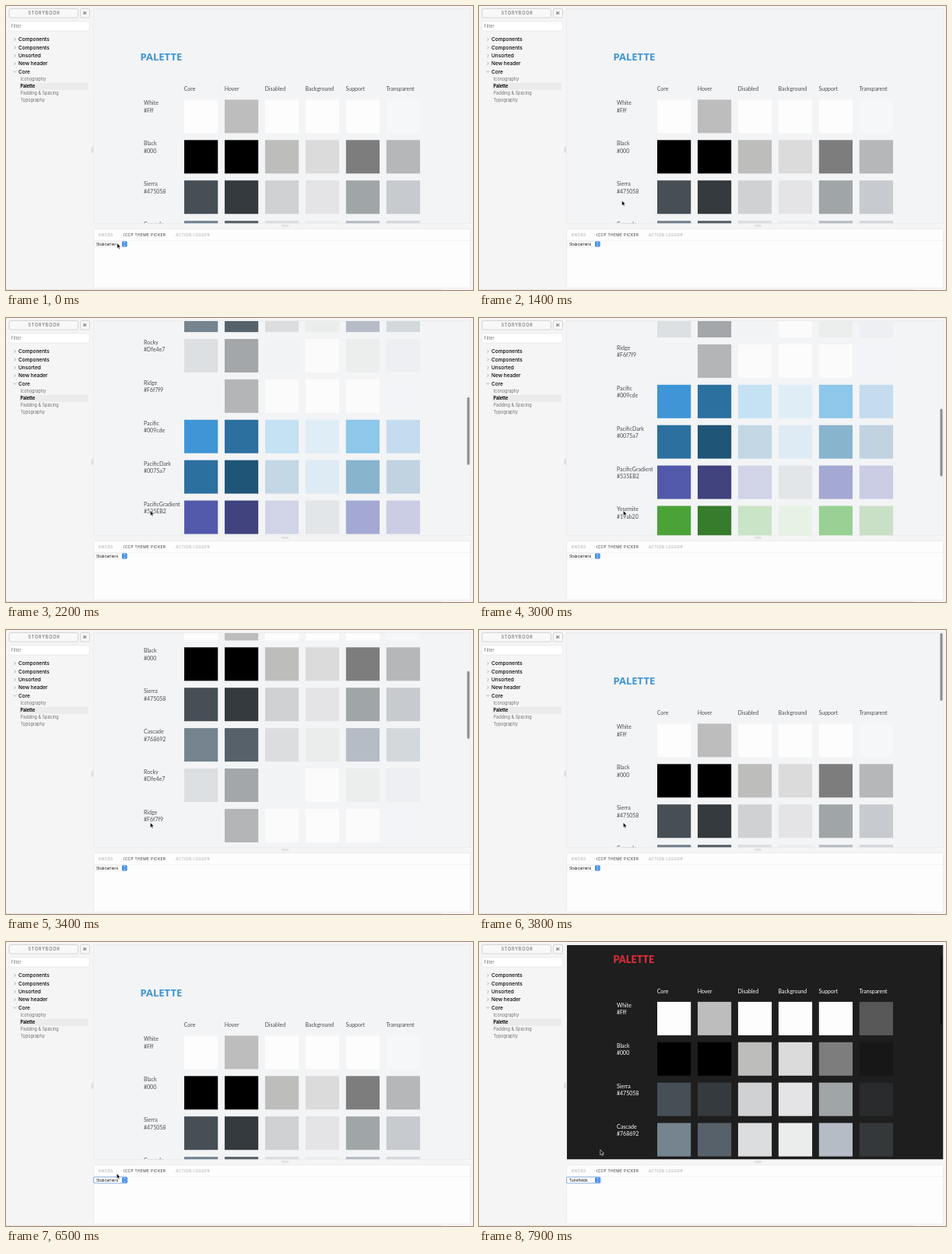
An HTML page that plays this animation: 600 px wide and 365 px high, repeating every 8 s.

```html
<!DOCTYPE html>
<html lang="en">
<head>
<meta charset="utf-8">
<style>
  html, body { margin: 0; width: 100%; height: 100%; overflow: hidden; background: #f5f5f5; }
  svg { display: block; --page: #f3f4f6; --ink: #4b4e53; --title: #3d95d6; font: 5.5px Inter, sans-serif; }
  svg.dark { --page: #1e1e1e; --ink: #fff; --title: #da2a3c; }
  text { white-space: pre; }
  .page { fill: var(--page); }
  .palette text { font: 7px Lato, sans-serif; fill: var(--ink); }
  .palette .title { font: 700 13px "Open Sans", sans-serif; fill: var(--title); }
  .dark .palette .title { font: 900 12.6px Lato, sans-serif; }
  .group { font-size: 6.5px; font-weight: 500; }
  .story { fill: #6f6f6f; }
  .active { fill: #000; font-weight: 700; }
  .tab { font-size: 4.8px; letter-spacing: .38px; fill: #a9a9a9; }
  .tab.on { fill: #333; }
  .brand { font-weight: 600; letter-spacing: .75px; fill: #828282; }
  .small { font-size: 4.8px; }
  .line { fill: none; stroke: #888; stroke-width: .7; }
</style>
</head>
<body>
<svg id="stage" width="600" height="365" viewBox="0 0 600 365">
  <clipPath id="view"><rect x="113" y="4" width="483.5" height="275.5"/></clipPath>
  <rect width="600" height="365" fill="#f5f5f5"/>
  <rect y="364" width="560" height="1" fill="#e4e4e4"/>

  <g fill="#f8f8f8" stroke="#c6c6c6" stroke-width=".7">
    <rect x="4" y="3.5" width="88.5" height="11.5" rx="1.5"/>
    <rect x="95.5" y="3.5" width="12" height="11.5" rx="1.5"/>
    <rect x="4" y="20" width="103.5" height="12" rx="1.5" fill="#fff" stroke="#e6e6e6"/>
  </g>
  <text class="brand" x="28.5" y="11.3">STORYBOOK</text>
  <text x="98.6" y="11.3" fill="#555" style="font-family:'DejaVu Sans',sans-serif">⌘</text>
  <text x="6.5" y="28.1" fill="#777">Filter</text>
  <rect x="17" y="98.8" width="89" height="8.8" fill="#ebebeb"/>
  <g id="tree"></g>
  <path class="line" d="M110 180.5v8M111.3 180.5v8M354 281.8h9M354 283.3h9" style="stroke:#ccc"/>

  <g clip-path="url(#view)">
    <rect class="page" x="112" y="3" width="486" height="278"/>
    <g class="palette" id="palette"><text class="title" x="172.5" y="70.3">PALETTE</text></g>
    <rect id="thumb" x="592.5" width="3" height="87" rx="1.5" fill="#000" fill-opacity=".43"/>
  </g>
  <rect x="112.6" y="3.6" width="484.2" height="276.2" fill="none" stroke="#e9e9ea" stroke-width=".7"/>

  <rect x="112.6" y="286.6" width="484" height="75.6" rx="1" fill="#fdfdfd" stroke="#e9e9e9" stroke-width=".7"/>
  <path d="M113 301.5h483.5" stroke="#eee" stroke-width=".7"/>
  <text class="tab" x="119" y="295.8">KNOBS</text>
  <text class="tab on" x="151" y="295.8">ICCP THEME PICKER</text>
  <text class="tab" x="218" y="295.8">ACTION LOGGER</text>

  <rect id="ring" x="112.6" y="302.2" width="43.2" height="7.6" rx="1.8" fill="none" stroke="#7fb2ee" stroke-width="1.4"/>
  <rect x="113" y="302.6" width="42.4" height="6.8" rx="1.3" fill="#fff" stroke="#d5d5d5" stroke-width=".4"/>
  <rect x="149" y="302.4" width="6.6" height="7.2" rx="1.3" fill="#3f8cf3"/>
  <path d="M150.9 305.2l1.4-1.4 1.4 1.4M150.9 306.8l1.4 1.4 1.4-1.4" fill="none" stroke="#fff" stroke-width=".7"/>
  <text id="choice" class="small" x="116" y="307.8"></text>

  <g id="menu" class="small">
    <rect x="108" y="290.5" width="52" height="30.5" rx="2" fill="#f2f2f2" stroke="#c9c9c9" stroke-width=".5"/>
    <rect id="hover" x="108.2" width="51.6" height="9" fill="#3f8cf3"/>
  </g>
  <path id="cursor" d="M0 0V6.6L1.5 5.2 2.6 7.6 3.7 7.1 2.7 4.8H4.8Z" fill="#000" stroke="#fff" stroke-width=".6"/>
</svg>

<script>
const $ = id => document.getElementById(id);
const add = (id, markup) => $(id).insertAdjacentHTML('beforeend', markup);

// Sidebar
['Components', 'Components', 'Unsorted', 'New header', 'Core'].forEach((name, i) => {
  const y = 43 + 10.35 * i;
  const arrow = name === 'Core' ? `M9.7 ${y - .8}l1.7 1.7 1.7-1.7` : `M10.6 ${y - 1.7}l1.7 1.7-1.7 1.7`;
  add('tree', `<path class="line" d="${arrow}"/><text class="group" x="16" y="${y + 2.3}">${name}</text>`);
});
['Iconography', 'Palette', 'Padding & Spacing', 'Typography'].forEach((name, i) =>
  add('tree', `<text class="${i === 1 ? 'active' : 'story'}" x="18.6" y="${96 + 9.1 * i}">${name.replace('&', '&amp;')}</text>`));

// Palette: name, code, then core, hover, disabled, background and support colours
const COLUMNS = ['Core', 'Hover', 'Disabled', 'Background', 'Support', 'Transparent'];
const ROWS = `White #Fff fdfdfd bdbdbd fdfdfd fdfdfd fdfdfd
Black #000 000000 000000 bdbdbc dbdbdb 7d7d7d
Sierra #475058 464e56 353a3f d0d1d2 e4e4e6 a0a6a7
Cascade #768692 75848f 56616a dcddde ebedec b6bcc6
Rocky #Dfe4e7 dce0e3 a4a7a9 f2f3f4 fbfbfb eceeed
Ridge #F6f7f9 f3f4f6 b4b5b7 fbfbfb fcfcfc fbfbfb
Pacific #009cde 3f95d5 2c709f c4e2f3 dfedf7 8dc7e9
PacificDark #0075a7 2c709f 1f5577 c3d7e5 deebf4 88b4ce
PacificGradient #535EB2 5359aa 40437d d0d4e6 e2e6e9 a4a9d3
Yosemite #19ab20 4ba338 377b2c c9e4c6 e6f2e3 99d094`;
const columnX = i => 229 + 51.95 * i;
COLUMNS.forEach((name, i) => add('palette', `<text x="${columnX(i) - .3}" y="109.2">${name}</text>`));
ROWS.split('\n').forEach((row, r) => {
  const [name, code, ...colors] = row.split(' ');
  const y = 120.4 + 51.9 * r;
  add('palette', `<text x="177" y="${y + 6.9}">${name}</text><text x="177" y="${y + 16.4}">${code}</text>`);
  // The transparent column is the core colour at a quarter strength
  [...colors, colors[0]].forEach((color, i) => add('palette',
    `<rect x="${columnX(i)}" y="${y}" width="43.2" height="43" fill="#${color}" fill-opacity="${i === 5 ? .25 : 1}"/>`));
});

// Theme menu
const THEMES = ['Tunefields', 'Stubcarriers', 'Default'];
const options = THEMES.map((name, i) => {
  add('menu', `<text x="116" y="${298.8 + 9 * i}">${name}</text>`);
  return $('menu').lastElementChild;
});
add('menu', '<path id="check" d="M110.8 306l1.2 1.4 1.9-3" fill="none" stroke-width=".8"/>');

const CURSOR = [[700, 142.8, 305], [1500, 185.3, 247.5], [3800, 185.3, 247.5], [4500, 142.8, 305.5],
  [4700, 142.8, 305.5], [5100, 143, 314], [5400, 143, 306], [5900, 143, 306], [6200, 142.2, 297.6],
  [6500, 142.2, 297.6], [6800, 147, 279.5], [7300, 147, 279.5], [7600, 155.8, 267]];
const SCROLL = [[1600, 0], [1700, 15], [1800, 75], [1900, 148], [2000, 212], [2100, 264], [2200, 301],
  [2300, 321], [2500, 339], [2800, 346.5], [2900, 346.5], [3000, 346], [3200, 285], [3400, 150],
  [3600, 40], [3800, 0], [7700, 0], [7900, 43.5]];
const linear = k => k;
const smooth = k => k * k * (3 - 2 * k);

function track(keys, t, ease) {
  const next = keys.findIndex(key => key[0] > t);
  if (next < 1) return keys.at(next).slice(1);
  const [from, to] = [keys[next - 1], keys[next]];
  const k = ease((t - from[0]) / (to[0] - from[0]));
  return from.slice(1).map((v, i) => v + (to[i + 1] - v) * k);
}
const show = (id, on) => $(id).style.display = on ? '' : 'none';

function draw(t) {
  const [x, y] = t < CURSOR[0][0] ? CURSOR[0].slice(1) : track(CURSOR, t, smooth);
  const [scroll] = t < SCROLL[0][0] ? [0] : track(SCROLL, t, linear);
  const dark = t >= 6600;
  $('stage').classList.toggle('dark', dark);
  $('cursor').setAttribute('transform', `translate(${x} ${y})`);
  $('palette').setAttribute('transform', `translate(0 ${-scroll})`);
  $('thumb').setAttribute('y', 4 + scroll * .325);
  show('thumb', t >= 1700 && t < 4400 || t >= 7800);
  show('ring', t >= 4600);
  show('menu', t >= 4600 && t < 6400);
  $('choice').textContent = THEMES[dark ? 0 : 1];

  const hovered = Math.max(0, Math.min(2, Math.floor((y - 292.5) / 9)));
  $('hover').setAttribute('y', 292.5 + 9 * hovered);
  options.forEach((option, i) => option.setAttribute('fill', i === hovered ? '#fff' : '#000'));
  $('check').setAttribute('stroke', hovered === 1 ? '#fff' : '#000');
}

function tick() {
  draw(Math.floor(performance.now() % 8000 / 100) * 100);
  requestAnimationFrame(tick);
}
tick();
</script>
</body>
</html>
```
